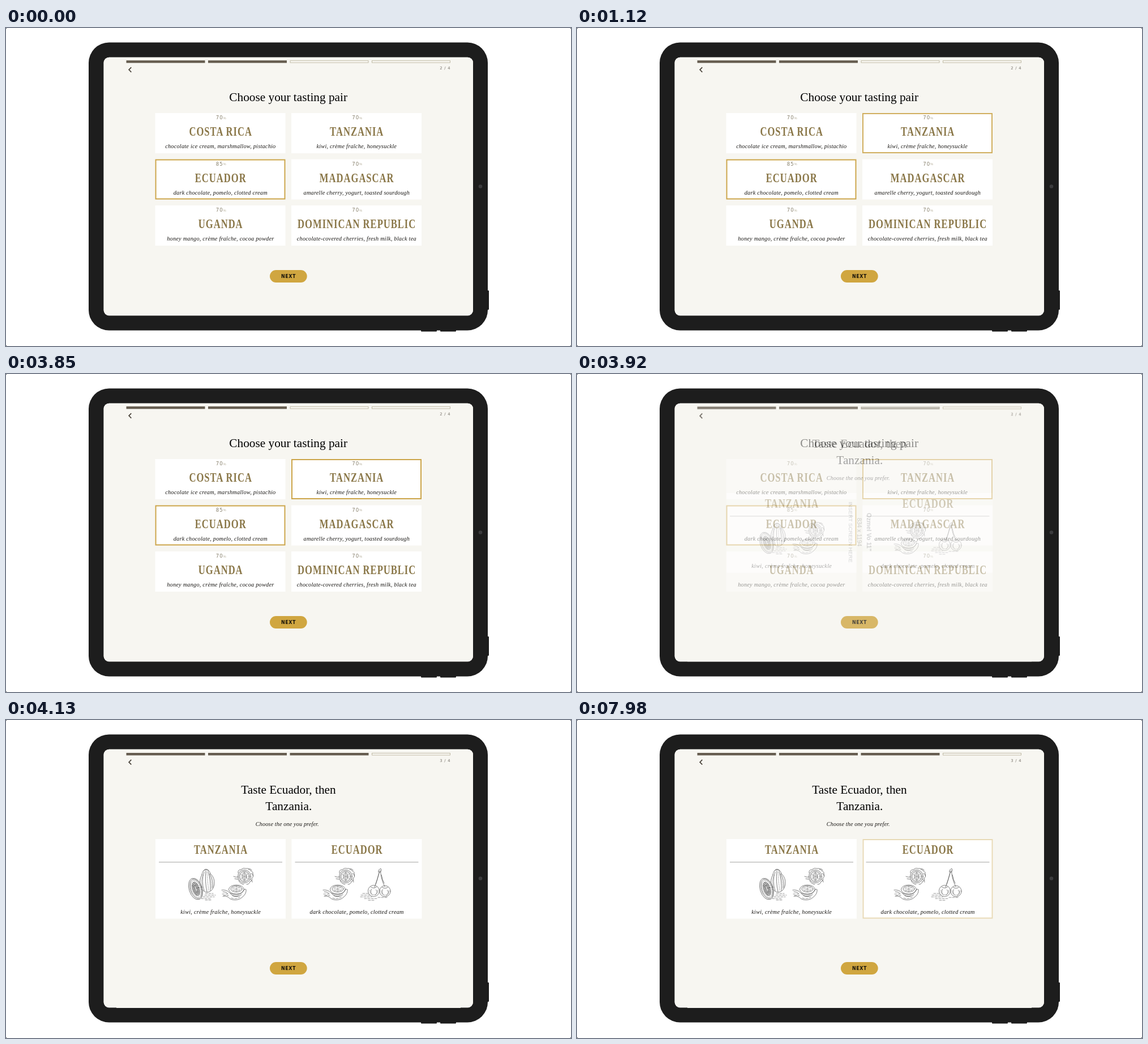
Animation of 998 by 561 pixels, one loop 8 s. Source, as an HTML page:

```html
<!DOCTYPE html>
<html lang="en">
<head>
<meta charset="utf-8">
<title>Tasting pair</title>
<style>
  html, body { margin: 0; height: 100%; overflow: hidden; background: #000; }
  svg { display: block; width: 100vw; height: 100vh; }
  text { text-anchor: middle; }
  .title { font: 21.3px "Liberation Serif", serif; }
  .notes { font: italic 10.3px "Liberation Serif", serif; letter-spacing: .22px; fill: #1c1a17; }
  .hint { font-size: 10.1px; letter-spacing: .17px; }
  .name { font: bold 22.5px "Liberation Serif", serif; letter-spacing: 1.3px; fill: #8a7748; }
  .pct { font: 8.6px "DejaVu Sans", sans-serif; letter-spacing: 1.2px; fill: #857e69; }
  .sign { font: 5.8px "Liberation Sans", sans-serif; fill: #b5ae9a; }
  .step { font: 6.8px "DejaVu Sans", sans-serif; letter-spacing: .8px; fill: #77726a; }
  .next { font: bold 8px "DejaVu Sans", sans-serif; letter-spacing: .6px; fill: #17130a; }
  .label { font-family: "Liberation Sans", sans-serif; fill: #4b4b4b; }
  .sketch { fill: none; stroke: #4d4d4d; stroke-width: .7; stroke-linecap: round; }
  .hatch { stroke-dasharray: 4 2; stroke-width: .6; }
  .seeds { stroke-width: 1.8; stroke-dasharray: 0 2.3; stroke: #444; }
  .skin { stroke-dasharray: 1.5 1.5; stroke-width: .5; }
  .solid { fill: #fff; }
</style>
</head>
<body>
<svg id="stage" viewBox="0 0 998 561" preserveAspectRatio="none"></svg>
<script>
const PAPER = '#f7f6f1', GOLD = '#cca54a', BROWN = '#655c4f';
const LOOP = 8000, STEP = 70, STEPS = 5;

const rect = (x, y, w, h, fill, more = '') =>
  `<rect x="${x}" y="${y}" width="${w}" height="${h}" fill="${fill}" ${more}/>`;
const text = (cls, x, y, s) => `<text class="${cls}" x="${x}" y="${y}">${s}</text>`;
const name = (x, y, s) =>
  `<text class="name" transform="translate(${x + .4} ${y}) scale(.74 1)">${s}</text>`;
const frame = (x, y, w, h, id = '') =>
  rect(x + 1, y + 1, w - 2, h - 2, 'none', `id="${id}" stroke="${GOLD}" stroke-width="2"`);
const path = (d, cls = '') => `<path class="${cls}" d="${d}"/>`;
const screen = rect(172.6, 51.8, 652.4, 455.4, PAPER, 'rx="9.5"');

function card(x, y, pct, title, notes) {
  const mid = x + 115.3;
  return rect(x, y, 230, 71, '#fff') +
    text('pct', mid - 1.5, y + 11.4, pct) + text('sign', mid + 7.2, y + 10.6, '%') +
    name(mid, y + 40, title) + text('notes', mid, y + 62, notes);
}

function pairCard(x, title, notes) {
  const mid = x + 115.2;
  return rect(x, 210, 230, 140.5, '#fff') + name(mid, 236, title) +
    rect(x + 6, 250.3, 218, 1, '#a3a3a0') + text('notes', mid, 341.8, notes);
}

function chrome(step, dy) {
  let s = screen;
  for (let i = 0; i < 4; i++) {
    const x = 212.5 + i * 144.5, y = 57.2 + dy;
    s += i < step ? rect(x, y, 139, 4.4, BROWN)
      : rect(x + .5, y + .5, 138, 3.4, '#fbfaf6', 'stroke="#b9b29b" stroke-width=".9"');
  }
  return s + `<path d="M221.3 ${69.3 + dy}l-4.2 4.3 4.2 4.3" fill="none" stroke="#4a443b" stroke-width="1.7"/>` +
    text('step', 775.8, 73 + dy, step + ' / 4') +
    rect(466, 427, 65.7, 22, '#d0a640', 'rx="11"') + text('next', 499, 440.8, 'NEXT');
}

const papaya = `<g class="sketch">
  ${path('M346 273Q340 284 344 294Q348 304 356 304Q366 302 368 290Q369 278 361 271Q359 264 353 263Q347 265 346 273z', 'solid')}
  ${path('M350 268Q344 284 350 301M353 266Q351 285 355 303M357 267Q362 284 361 301M360 271Q367 284 365 296M349 266q4-4 9 0')}
  ${path('M348 274Q343 284 347 297M355 268Q356 285 358 301M359 272Q364 285 363 298', 'skin')}
  ${path('M352 306h14M351 309h19M348 312h20M345 315h18M352 317.5h10', 'hatch')}
  <g transform="rotate(-18 335 298)">
    <ellipse class="solid" cx="335" cy="298" rx="11.5" ry="19.5"/>
    <ellipse cx="335.5" cy="298" rx="9.7" ry="17.5"/>
    <ellipse class="skin" cx="335.5" cy="298" rx="8" ry="15"/>
    ${[[5.5, 12], [3.5, 9.5], [1.5, 7]].map(([rx, ry]) =>
      `<ellipse class="seeds" cx="335.5" cy="298" rx="${rx}" ry="${ry}"/>`).join('')}
  </g></g>`;

const hands = dx => `<g class="sketch" transform="translate(${dx} 0)">
  <circle class="solid" cx="421" cy="276" r="11.5"/>
  <circle cx="421" cy="276" r="9.3"/><circle class="skin" cx="421" cy="276" r="7.5"/>
  <ellipse cx="421" cy="276" rx="4" ry="6"/><ellipse class="skin" cx="421" cy="276" rx="2" ry="4"/>
  ${path('M421 268v16M414 272l14 8M414 281l14-10', 'skin')}
  ${path('M410 270q-1-6 5-6q4-4 9-2q6-1 8 4q5 1 4 6q2 5-2 7q2 5-3 6q-1 5-6 5M428 264q4-3 6 1M433 271q4 0 3 4M431 281q4 1 4 5M402 276q4 2 8 1M404 280l6 1M411 283q2 6 9 7')}
  <ellipse class="solid" cx="407" cy="299" rx="13.5" ry="8"/>
  <ellipse cx="407" cy="298" rx="10" ry="5.5"/><ellipse class="skin" cx="407" cy="298" rx="7" ry="3.5"/>
  ${path('M407 293v10M400 296l14 5M401 301l12-6', 'skin')}
  ${path('M381 300q8-1 13 4q8 6 19 3q4-1 6-6q3-4 5-2q1 7-6 13q-7 7-18 5q-5-1-8-5q-4-2-9-1M396 306q6 7 15 4M400 310q8 4 16-2M383 303q7 0 9 4')}
  ${path('M382 307h9M384 309.5h9M398 314q8 3 16-2', 'hatch')}</g>`;

const cherry = (x, y, r) => `<circle class="solid" cx="${x}" cy="${y}" r="${r}"/>` +
  path(`M${x - 5} ${y - 7}q5 4 10 0M${x - 4} ${y - 3}q-3 5 1 9M${x + 4} ${y - 2}q4 4 0 8`) +
  path(`M${x - 7} ${y - 1}q0 6 5 8M${x + 7} ${y - 1}q0 6-5 8M${x - 1} ${y + 7}h5`, 'skin');

const cherries = `<g class="sketch">
  ${path('M627 309h17M630 306h10M626 312h20M633 315h22M640 318h10M657 313h16', 'hatch')}
  ${cherry(649.5, 301.5, 10)}${cherry(669.5, 302, 9.7)}
  ${path('M660 266Q656 282 651 295M661.5 266Q662 280 669 294M659 270Q656 281 653 290M663 273Q665 283 668 288M659 264l3-2 1 3-2 4-3-1z')}</g>`;

const choose = chrome(2, 0) + text('title', 498.7, 128.8, 'Choose your tasting pair') +
  card(263.5, 150, 70, 'COSTA RICA', 'chocolate ice cream, marshmallow, pistachio') +
  card(504, 150, 70, 'TANZANIA', 'kiwi, crème fraîche, honeysuckle') +
  card(263.5, 231.5, 85, 'ECUADOR', 'dark chocolate, pomelo, clotted cream') +
  card(504, 231.5, 70, 'MADAGASCAR', 'amarelle cherry, yogurt, toasted sourdough') +
  card(263.5, 313, 70, 'UGANDA', 'honey mango, crème fraîche, cocoa powder') +
  card(504, 313, 70, 'DOMINICAN REPUBLIC', 'chocolate-covered cherries, fresh milk, black tea') +
  frame(263.5, 231.5, 230, 71) + frame(504, 150, 230, 71, 'pick');

const taste = chrome(3, .8) + rect(195, 507, 608, 1, PAPER) +
  text('title', 499, 129.8, 'Taste Ecuador, then') + text('title', 499.3, 158.5, 'Tanzania.') +
  text('notes hint', 496.8, 187, 'Choose the one you prefer.') +
  pairCard(264, 'TANZANIA', 'kiwi, crème fraîche, honeysuckle') +
  pairCard(504.5, 'ECUADOR', 'dark chocolate, pomelo, clotted cream') +
  papaya + hands(0) + hands(179) + cherries + frame(504.5, 210, 230, 140.5, 'prefer');

const label = (x, size, weight, s) =>
  `<text class="label" transform="translate(${x} 279) rotate(90)" font-size="${size}" font-weight="${weight}">${s}</text>`;

const tablet = rect(0, 0, 998, 561, '#fff', 'rx="2"') +
  [[733, 530, 28, 5.5], [767, 530, 28, 5.5], [848, 463, 5, 34]]
    .map(([x, y, w, h]) => rect(x, y, w, h, '#1d1d1d', 'rx="1"')).join('') +
  rect(146, 25.5, 705, 508, '#1d1d1d', 'rx="36"') +
  '<circle cx="838" cy="279.5" r="3.3" fill="#3c3c3e"/>' + screen +
  label(511.5, 10.8, 700, 'Ozmel Vo 11"') + label(495, 10.4, 400, '834 x 1194') +
  label(480, 9.65, 400, 'INSERT SCREEN HERE');

const $ = id => document.getElementById(id);
$('stage').innerHTML = `${tablet}<g id="choose">${choose}</g><g id="taste">${taste}</g>`;

// Each transition eases out over five held steps, the first still at zero.
function progress(t, start) {
  const step = Math.floor((t - start) / STEP);
  const p = Math.min(1, Math.max(0, step / (STEPS - 1)));
  return 1 - (1 - p) ** 1.5;
}

// The frame first appears in the paper colour, then turns gold.
function showFrame(id, t, start) {
  const gold = progress(t, start) * 100;
  $(id).style.stroke = t < start ? 'none' : `color-mix(in srgb, ${GOLD} ${gold}%, ${PAPER})`;
}

function draw() {
  const t = performance.now() % LOOP, fade = progress(t, 3850);
  $('choose').style.opacity = 1 - fade;
  $('taste').style.opacity = fade;
  showFrame('pick', t, 910);
  showFrame('prefer', t, 7910);
  requestAnimationFrame(draw);
}
draw();
</script>
</body>
</html>
```
